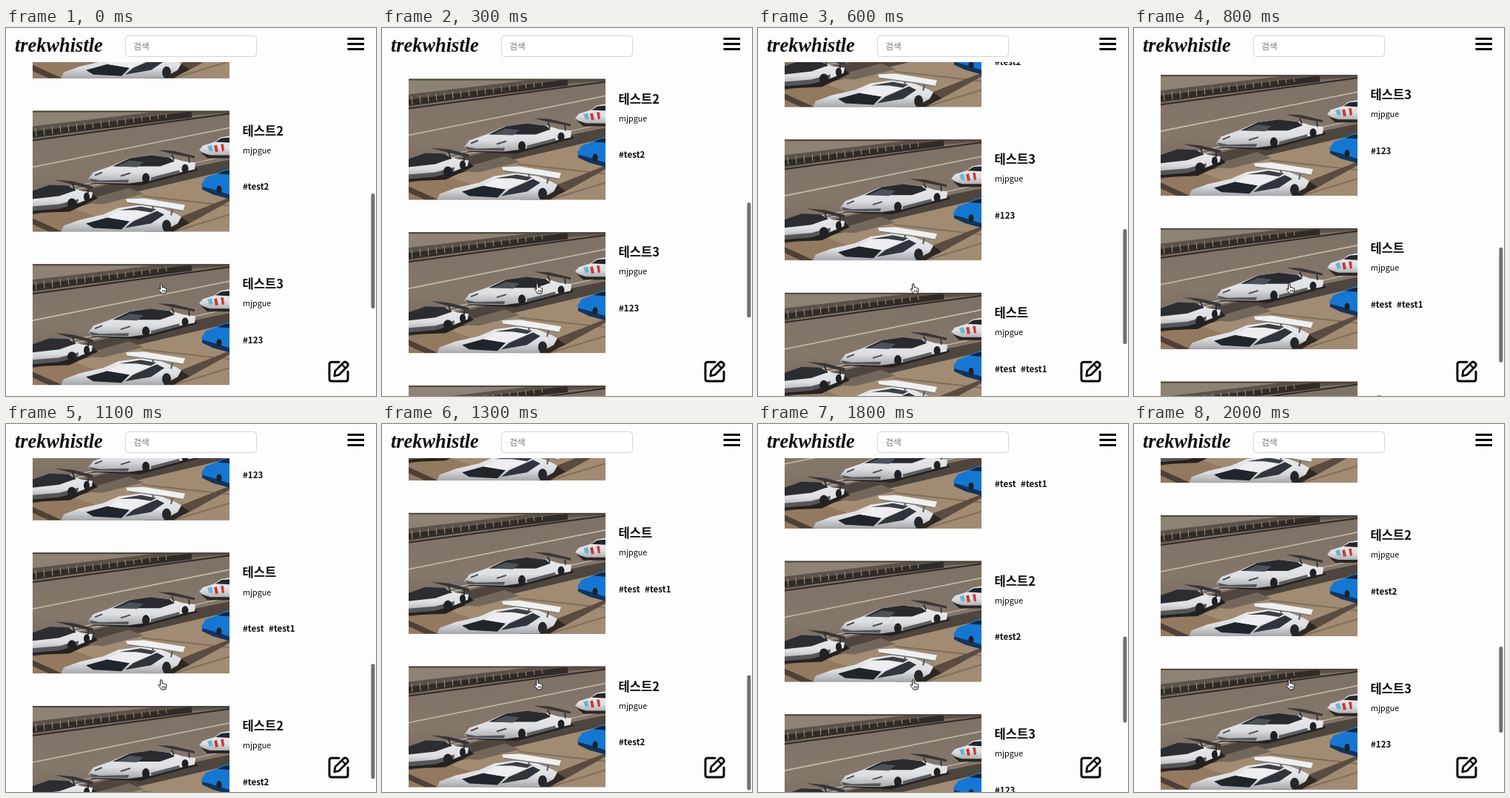
An HTML page for the animation above (2100 ms loop, 500 px wide and 496 px high).

```html
<!DOCTYPE html>
<html lang="ko">
<head>
<meta charset="utf-8">
<title>Feed</title>
<style>
  html, body { margin: 0; width: 100%; height: 100%; overflow: hidden; background: #fdfdfd; }
  svg { display: block; }
  text { font-family: "Noto Sans CJK KR", "Noto Sans KR", "Noto Sans CJK", sans-serif; fill: #0c0c0c; white-space: pre; }
  .title { font-size: 16.6px; font-weight: 700; }
  .user { font-size: 10.8px; }
  .tags { font-size: 11.6px; font-weight: 700; }
  .brand { font: italic 700 26.4px "Liberation Serif", "Noto Serif", serif; }
  .hint { font-size: 11.6px; fill: #757575; }
</style>
</head>
<body>
<svg id="stage" width="500" height="496" viewBox="0 0 500 496">
  <defs>
    <linearGradient id="asphalt" x2="0" y2="1">
      <stop offset="0" stop-color="#7d7065"/>
      <stop offset=".5" stop-color="#85776a"/>
      <stop offset="1" stop-color="#6b5d51"/>
    </linearGradient>
    <linearGradient id="paint" x2="0" y2="1">
      <stop offset="0" stop-color="#ececee"/>
      <stop offset=".6" stop-color="#dcdee1"/>
      <stop offset="1" stop-color="#a5a6aa"/>
    </linearGradient>

    <symbol id="photo" viewBox="0 0 266 163">
      <rect width="266" height="163" fill="url(#asphalt)"/>
      <!-- pit wall and fence -->
      <path d="M0 0H266V3L180 9 0 38Z" fill="#5b5249"/>
      <path d="M0 0H178L0 21Z" fill="#8d8273"/>
      <path d="M0 1H266" stroke="#4b443c" stroke-width="2"/>
      <path d="M0 32L215 5" stroke="#302b27" stroke-width="8"/>
      <path id="posts" stroke="#a39687" fill="none"/>
      <path d="M0 40L266 4" stroke="#2f2a27" stroke-width="2"/>
      <path d="M0 76L266 23" stroke="#c9bba8" stroke-width="1.6"/>
      <!-- sandy apron -->
      <path d="M0 131L90 106 190 94 266 74V163H0Z" fill="#a18b73"/>
      <path d="M0 124L100 100 266 66V80L150 107 0 145Z" fill="#4d453e"/>
      <path d="M60 124L130 104 150 112 95 126Z" fill="#73675b"/>
      <path d="M148 115L266 128M190 163L266 140" stroke="#806e5a" stroke-width="2" fill="none"/>
      <path d="M0 140L52 131 84 142 40 163H0Z" fill="#93795f"/>
      <path d="M0 145L40 163H22L0 153Z" fill="#4d4036"/>
      <path d="M200 143L266 117V122L206 155Z" fill="#5a4c40"/>
      <path d="M0 119L266 60M85 96L30 107" stroke="#c5bbae" stroke-width="1.2"/>
      <!-- striped car -->
      <path d="M225 53L230 47 246 42 254 36 266 34V62L236 60Z" fill="url(#paint)"/>
      <path d="M247 42L255 37 266 36V43Z" fill="#23272d"/>
      <path d="M236 48L242 46 244 54 239 55Z" fill="#6bb3d8"/>
      <path d="M245 47L249 46 251 55 247 56ZM254 45L258 45 259 54 256 55Z" fill="#c83b36"/>
      <path d="M227 56L240 60 266 60V64H236Z" fill="#2a2725"/>
      <!-- blue car -->
      <path d="M228 99L234 90 248 85 258 80 266 78V118L250 112 230 106Z" fill="#1677d2"/>
      <path d="M250 85L259 81 266 80V86Z" fill="#182638"/>
      <path d="M229 102L244 106 266 113V119L244 113 229 106Z" fill="#12345d"/>
      <ellipse cx="252" cy="106" rx="3.500" ry="5" fill="#1d2027"/>
      <!-- middle car -->
      <path d="M78 98L145 101 224 80 215 74 120 88Z" fill="#26221f"/>
      <path d="M75 92L82 83 105 75 130 64 158 60 187 63 203 68 220 70 219 79 200 83 160 94 130 98 82 97Z" fill="url(#paint)"/>
      <path d="M108 75L131 64 159 60 185 63 192 68 172 75 148 75Z" fill="#282a2f"/>
      <path d="M113 75L131 67 150 69 141 76Z" fill="#4d525a"/>
      <path d="M76 91L91 94 130 93 129 97 80 96Z" fill="#53565b"/>
      <path d="M160 90L198 80 199 84 160 94Z" fill="#5d5e62"/>
      <path d="M169 53L190 54 219 61 219 64 188 58Z" fill="#383638"/>
      <path d="M188 59L191 66M211 63L212 70" stroke="#333" stroke-width="2"/>
      <ellipse cx="153" cy="91" rx="5" ry="7" fill="#202124"/>
      <ellipse cx="206" cy="78" rx="4.500" ry="6" fill="#202124"/>
      <path d="M84 87L94 83M119 88L132 84" stroke="#4a4d52" stroke-width="2"/>
      <!-- left car -->
      <path d="M0 138L50 136 88 118 80 111 0 124Z" fill="#25211e"/>
      <path d="M0 109L25 101 50 102 65 108 81 110 80 117 61 125 36 131 0 134Z" fill="url(#paint)"/>
      <path d="M0 108L23 100 48 101 59 107 36 115 0 119Z" fill="#2b2d32"/>
      <path d="M0 129L36 126 62 119 61 125 36 132 0 135Z" fill="#55555a"/>
      <path d="M30 93L54 95 82 102 81 106 52 99Z" fill="#35363a"/>
      <path d="M54 99L57 108M75 104L75 111" stroke="#303033" stroke-width="2"/>
      <ellipse cx="53" cy="125" rx="6" ry="7" fill="#202124"/>
      <ellipse cx="73" cy="116" rx="4" ry="6" fill="#202124"/>
      <!-- front car -->
      <path d="M150 163L200 143 212 151 190 163Z" fill="#2f2822"/>
      <path d="M38 163L42 155 64 147 95 140 116 131 146 127 174 131 194 139 201 143 196 152 176 163Z" fill="url(#paint)"/>
      <path d="M72 152L101 144 131 149 120 160 82 158Z" fill="#20252c"/>
      <path d="M101 144L119 134 146 130 167 134 132 149Z" fill="#eeeef0"/>
      <path d="M117 134L146 129 167 133 160 137 140 134Z" fill="#3b3f46"/>
      <path d="M125 158L136 149 168 135 178 140 160 152Z" fill="#30353d"/>
      <path d="M126 119L150 118 206 127 203 135 180 131 128 124Z" fill="#eff0f1"/>
      <path d="M128 124L180 131 203 135" stroke="#77787a" stroke-width="1.4" fill="none"/>
      <path d="M162 129L164 134M189 133L187 141" stroke="#55575b" stroke-width="2"/>
      <ellipse cx="181" cy="155" rx="6" ry="8" fill="#26272a"/>
    </symbol>
  </defs>

  <rect width="500" height="496" fill="#fdfdfd"/>
  <g id="feed"></g>

  <rect width="500" height="46" fill="#fdfdfd"/>
  <text class="brand" x="12" y="32">trekwhistle</text>
  <rect x="161.5" y="10.5" width="177" height="28" rx="4" fill="#fff" stroke="#d4d4d4"/>
  <text class="hint" x="172.300" y="28.500">검색</text>
  <path d="M461.500 14.500H484M461.500 21.500H484M461.500 28.500H484" stroke="#050505" stroke-width="3"/>

  <!-- compose button -->
  <g fill="none" stroke="#0a0a0a" stroke-width="3" stroke-linejoin="round">
    <path d="M450 450.300H440Q437 450.300 437 453.300V473Q437 476 440 476H459Q462 476 462 473V463" stroke-linecap="round"/>
    <path d="M443.800 469L444.800 462.300 456 451Q458.300 448.800 460.900 451.300T461.200 456.200L450 467.500Z" stroke-width="2.800"/>
    <path d="M453.800 453.500L458.700 458.400" stroke-width="2.200"/>
  </g>

  <rect id="thumb" x="493.400" width="5" rx="2.500" fill="#707070"/>

  <!-- hand pointer -->
  <g transform="translate(205.500 344)" stroke="#111" stroke-linejoin="round" stroke-linecap="round">
    <path d="M3 8V2Q3 .6 4.200.6T5.400 2V5.500Q7 4.800 7.500 6 9 5.400 9.400 6.600 11.300 6.300 11.300 8.300 11.300 11 9.900 14H4.700Q3.300 11 1 9.300 0 7.800 1.300 7.300 2.300 7.200 3 8Z" fill="#fff"/>
    <path d="M5.700 9.500V11.800M7.400 9.500V11.800M9 9.500V11.800" stroke-width=".7"/>
  </g>
</svg>
<script>
  const PITCH = 620 / 3, STEP = 100;
  const posts = [
    ["테스트", "#test  #test1"],
    ["테스트2", "#test2"],
    ["테스트3", "#123"]
  ];
  // Scroll distance at each step; it rests at the page end until more posts load.
  const scroll = [0, 8, 22, 43, 74, 117.5, 168, 214, 255, 291, 323,
    351.5, 378, 405, 405, 424, 463, 507, 547, 581, 608.5];
  const LOADED = 15;

  const feed = document.getElementById("feed");
  const thumb = document.getElementById("thumb");

  let fence = "";
  for (let x = 4; x < 190; x += 11) {
    const y = 24 - x * 0.11;
    fence += `M${x} ${y}l1 ${11 - x * 0.03}`;
  }
  document.getElementById("posts").setAttribute("d", fence);

  let html = "";
  for (let i = 0; i < 7; i++) {
    const [title, tags] = posts[i % 3];
    html += `<g transform="translate(0 ${111.5 + (i - 1) * PITCH})">
      <use href="#photo" x="36" width="266" height="163"/>
      <text class="title" x="319.500" y="33">${title}</text>
      <text class="user" x="320" y="57.300">mjpgue</text>
      <text class="tags" x="320" y="106.800">${tags}</text></g>`;
  }
  feed.innerHTML = html;

  function draw(now) {
    const step = Math.floor(now / STEP) % scroll.length;
    const d = scroll[step];
    const loaded = step >= LOADED;
    feed.setAttribute("transform", `translate(0 ${-d})`);
    thumb.setAttribute("y", loaded ? 268 + (d - 463) * 0.22 : 223 + d * 0.285);
    thumb.setAttribute("height", loaded ? 116 : 155);
  }

  const start = performance.now();
  function tick() {
    draw(performance.now() - start);
    requestAnimationFrame(tick);
  }
  tick();
</script>
</body>
</html>
```
